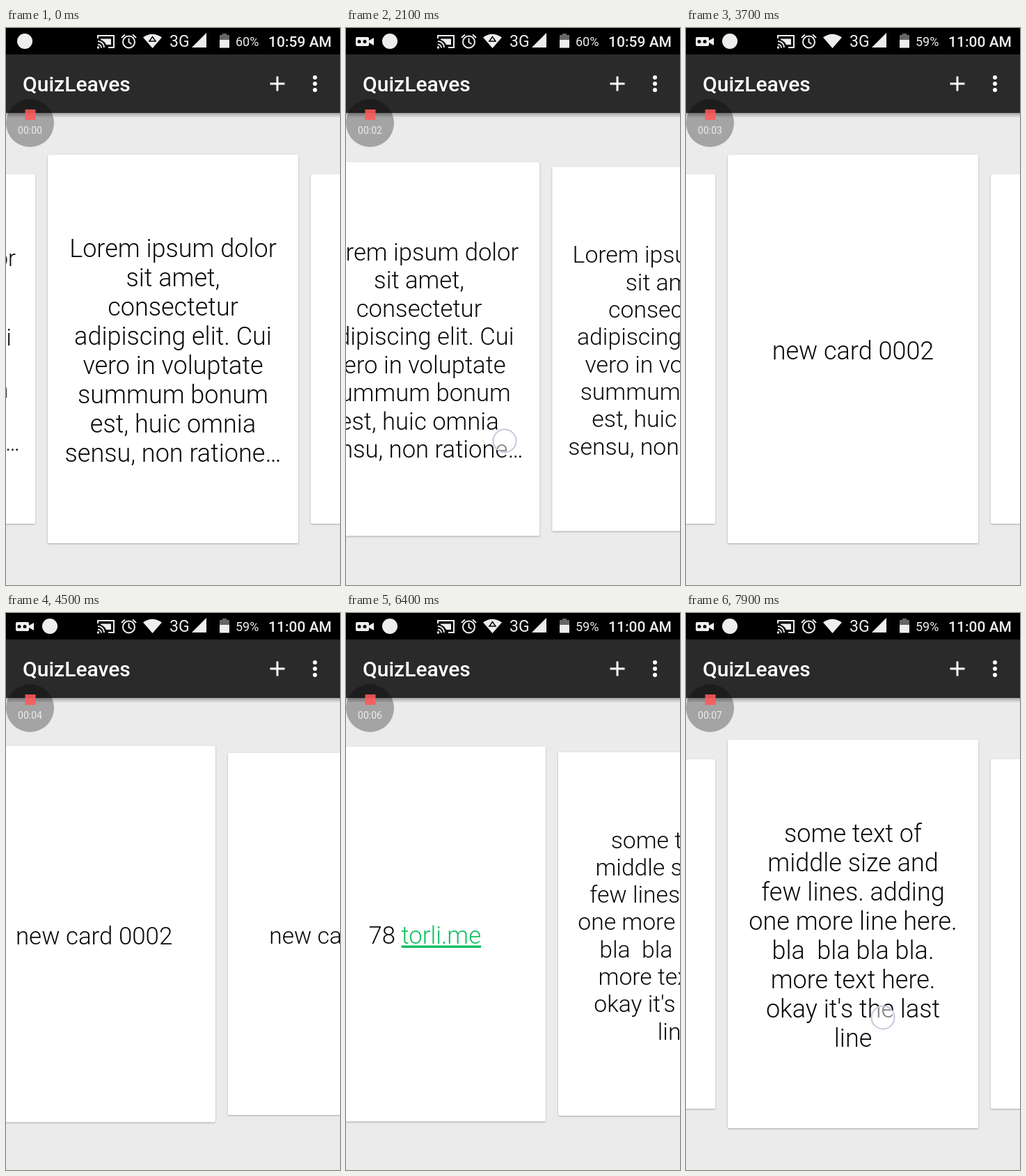
An HTML page for the animation above (8 s loop, 480 px wide and 800 px high).

```html
<!DOCTYPE html>
<html lang="en">
<head>
<meta charset="utf-8">
<title>Card pager</title>
<style>
  html, body { margin: 0; width: 100%; height: 100%; overflow: hidden; background: #ebebeb; }
  svg { display: block; width: 480px; height: 800px; font-family: Roboto, sans-serif; }
  .card rect { fill: #fff; filter: drop-shadow(0 1px 1px rgba(0, 0, 0, .3)); }
  .card text { font-size: 36px; font-weight: 300; text-anchor: middle; white-space: pre; fill: #0a0a0a; }
  .link { fill: #12c060; text-decoration: underline; }
  .line { fill: none; stroke: #eee; stroke-width: 2; }
</style>
</head>
<body>
<svg viewBox="0 0 480 800">
  <defs>
    <linearGradient id="shade" x2="0" y2="1">
      <stop stop-opacity=".3"/>
      <stop offset="1" stop-opacity="0"/>
    </linearGradient>
  </defs>
  <rect width="480" height="800" fill="#ebebeb"/>
  <g id="cards"></g>

  <rect y="122" width="480" height="7" fill="url(#shade)"/>
  <rect y="38" width="480" height="84" fill="#2a2a2a"/>
  <text x="24" y="91" font-size="30" font-weight="500" fill="#fff">QuizLeaves</text>
  <path d="M379.500 80h21M390 69.500v21" stroke="#fff" stroke-width="3"/>
  <g fill="#fff">
    <circle cx="444" cy="71" r="3"/><circle cx="444" cy="80" r="3"/><circle cx="444" cy="89" r="3"/>
  </g>

  <rect width="480" height="38"/>
  <g fill="#eee">
    <g id="camera">
      <rect x="14" y="13" width="19" height="13" rx="2"/>
      <path d="M33 18l7-4v11l-7-4z"/>
      <g fill="#000"><circle cx="19" cy="19.500" r="2.500"/><circle cx="27" cy="19.500" r="2.500"/></g>
    </g>
    <circle id="badge" cy="19" r="11"/>
    <g class="line">
      <path d="M132 15v-4h23v17h-8M132 19a9 9 0 0 1 9 9M132 23.500a5 5 0 0 1 5 5"/>
      <circle cx="176.500" cy="20" r="8.500"/>
      <path d="M176.500 14.500v6l4 2.500M166 14l5-4.500M187 14l-5-4.500"/>
    </g>
    <rect x="131" y="26.500" width="3" height="3"/>
    <path d="M136 15.500h15v8.500h-7a13 13 0 0 0-8-7z"/>
    <path d="M197 13.500Q210 4 224 13.500L210.500 29z"/>
    <path id="arrow" d="M206 19l4.500-6.500 4.500 6.500z" fill="#eee" stroke="#000" stroke-width="1.500"/>
    <text x="235" y="27" font-size="23">3G</text>
    <path d="M267 28h21V7z"/>
    <path d="M307 10h4V8h6v2h4v8h-14z" fill="#666"/>
    <rect x="307" y="17" width="14" height="11.500"/>
    <text id="battery" x="330" y="26" font-size="18"></text>
    <text id="clock" x="468" y="27" font-size="21" font-weight="500" text-anchor="end"></text>
  </g>

  <circle cx="34.500" cy="136.500" r="34.500" fill="#000" fill-opacity=".3"/>
  <rect x="27.500" y="117" width="15" height="15" fill="#ff5a5a" fill-opacity=".87"/>
  <text id="timer" x="34.500" y="152" font-size="14" text-anchor="middle" fill="#ececec"></text>
  <circle id="touch" r="16.500" fill="#fff" fill-opacity=".5" stroke="#c6c6dc" stroke-width="2"/>
</svg>
<script>
const LOOP = 8000, STEP = 100, PITCH = 360, LINE = 42;
const $ = id => document.getElementById(id);

const lorem = ['Lorem ipsum dolor', 'sit amet,', 'consectetur', 'adipiscing elit. Cui',
  'vero in voluptate', 'summum bonum', 'est, huic omnia', 'sensu, non ratione…'];
const pages = [
  lorem,
  lorem,
  ['a new card 0001'],
  ['new card 0002'],
  ['new card 0003'],
  ['that cursor is', 'visible now http://', 'www.torli.me', ''],
  ['78 torli.me'],
  ['some text of', 'middle size and', 'few lines. adding', 'one more line here.',
    'bla  bla bla bla.', 'more text here.', "okay it's the last", 'line'],
  []
];

// start, duration, pages moved
const swipes = [
  [850, 600, -1], [1900, 481, 1], [2385, 360, 1], [2745.5, 500, 1], [4313, 500, 1],
  [4840, 480, 1], [5344, 500, 1], [6200, 500, 1], [7032, 250, .4], [7300, 400, -.4]
];
// start, end, x at start, y
const touches = [
  [800, 1150, 130, 600], [1850, 2200, 363, 593], [2350, 2500, 360, 600],
  [2700, 2850, 360, 605], [4250, 4450, 360, 621], [4800, 4980, 355, 615],
  [5300, 5500, 350, 610], [6150, 6350, 345, 610], [7000, 7350, 337, 615], [7750, 8000, 283, 581]
];

const markLinks = line =>
  line.replace(/http:\/\/|(www\.)?torli\.me/g, '<tspan class="link">$&</tspan>');

$('cards').innerHTML = pages.map(lines => `<g class="card">
  <rect x="-180" y="-279" width="360" height="558" rx="2"/>
  ${lines.map((line, i) =>
    `<text y="${(i - lines.length / 2) * LINE + 36}">${markLinks(line)}</text>`).join('')}</g>`).join('');
const cards = [...$('cards').children];

const show = (el, on) => el.setAttribute('visibility', on ? 'visible' : 'hidden');

function ease(s) {
  s = Math.min(1, Math.max(0, s));
  return s * s * (3 - 2 * s);
}

function position(t) {
  return swipes.reduce((p, [start, time, by]) => p + by * ease((t - start) / time), 1);
}

function draw(t) {
  const p = position(t);
  cards.forEach((card, i) => {
    const offset = i - p;
    const scale = 1 - .1 * Math.min(1, Math.abs(offset));
    show(card, Math.abs(offset) < 1.5);
    card.setAttribute('transform', `translate(${240 + PITCH * offset} 461) scale(${scale})`);
  });

  const touch = touches.find(([start, end]) => t >= start && t < end);
  show($('touch'), touch);
  if (touch) {
    const [start, , x, y] = touch;
    $('touch').setAttribute('cx', x - PITCH * (p - position(start)));
    $('touch').setAttribute('cy', y);
  }

  const recording = t >= 200, late = t >= 3400;
  show($('camera'), recording);
  $('badge').setAttribute('cx', recording ? 63 : 27);
  show($('arrow'), t < 2500 || (t >= 5000 && t < 7000));
  $('battery').textContent = late ? '59%' : '60%';
  $('clock').textContent = late ? '11:00 AM' : '10:59 AM';
  $('timer').textContent = '00:0' + Math.floor(t / 1000);
}

const begin = performance.now();
function tick() {
  const t = (performance.now() - begin) % LOOP;
  draw(Math.floor(t / STEP) * STEP);
  requestAnimationFrame(tick);
}
tick();
</script>
</body>
</html>
```
